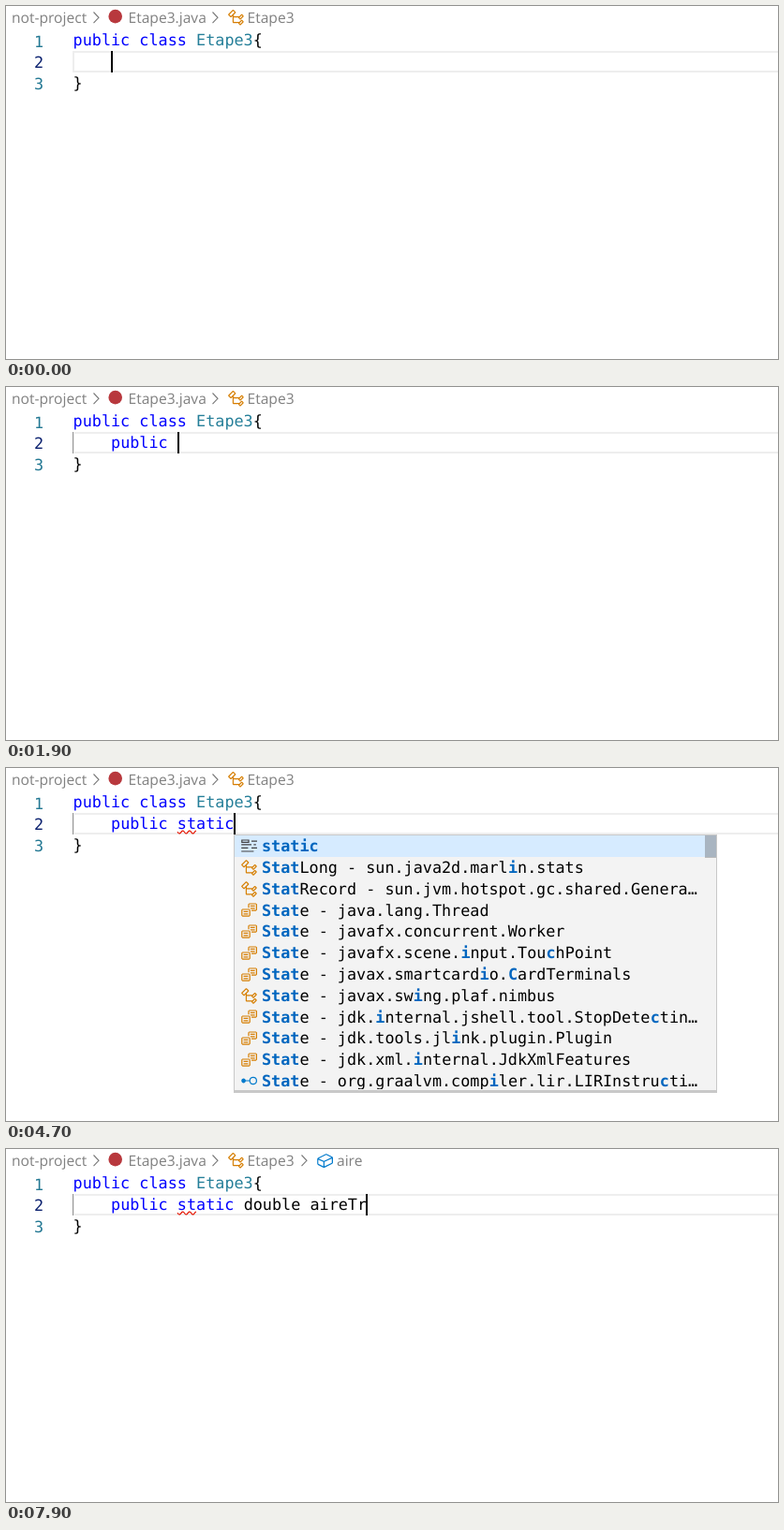
Animation, 824 px wide and 377 px high, one loop 8 s. Source, as an HTML page with a canvas:

```html
<!DOCTYPE html>
<html lang="en">
<head>
<meta charset="utf-8">
<title>Java editor typing</title>
<style>
html, body { margin: 0; width: 100%; height: 100%; overflow: hidden; background: #fff; }
canvas { display: block; }
</style>
</head>
<body>
<canvas id="stage" width="824" height="377"></canvas>
<script>
const ctx = document.getElementById('stage').getContext('2d');
const LOOP = 8000, CHAR = 10.114, ROW = 22.8, LEFT = 71.6;
const MONO = '16.8px "DejaVu Sans Mono", monospace';
const UI = '15.6px "Open Sans", sans-serif';
const BLUE = '#0000ff', TEAL = '#267f99', ORANGE = '#d67e00', SKY = '#007acc', DARK = '#424242';

// Icons on a 16 unit grid: colour, path
const icon = (color, d) => ({ color, path: new Path2D(d) });
const ICONS = {
  c: icon(ORANGE, 'M11.34 9.71h.71l2.67-2.67v-.71L13.38 5h-.7l-1.82 1.81h-5V5.56l1.86-1.85V3l-2-2H5L1 5v.71l2 2h.71l1.14-1.15v5.79l.5.5H10v.52l1.33 1.34h.71l2.67-2.67v-.71L13.37 10h-.7l-1.86 1.85h-5v-4H10v.48l1.34 1.38zm1.69-3.65l.63.63-2 2-.63-.63 2-2zm0 5l.63.63-2 2-.63-.63 2-2zM3.35 6.65l-1.29-1.3 3.29-3.29 1.3 1.29-3.3 3.3z'),
  i: icon(SKY, 'M11.5 4a3.49 3.49 0 0 0-3.46 3h-3.1a2 2 0 1 0 0 1h3.1a3.5 3.5 0 1 0 3.46-4zm0 6a2.5 2.5 0 1 1 0-5 2.5 2.5 0 0 1 0 5z'),
  k: icon(DARK, 'M15 4h-5V3h5v1zm-1 3h-2V6h2v1zm-4 0H1V6h9v1zm2 6H1v-1h11v1zm-5-3H1V9h6v1zm8 0h-5V9h5v1zM8 2v3H1V2h7zM7 3H2v1h5V3z'),
  s: icon(DARK, 'M2.5 1l-.5.5V13h1V2h11v11h1V1.5l-.5-.5zM2 14h1v1H2zM4 14h1v1H4zM6 14h1v1H6zM8 14h1v1H8zM10 14h1v1h-1zM12 14h1v1h-1zM14 14h1v1h-1z'),
  e: icon(ORANGE, 'M14 2H8L7 3v3h1V3h6v5h-4v1h4l1-1V3l-1-1zM9 6h4v1H9.41L9 6.59V6zM7 7H2L1 8v5l1 1h6l1-1V8L8 7H7zm1 6H2V8h6v5zM3 9h4v1H3V9zm0 2h4v1H3v-1zm6-7h4v1H9V4z'),
  f: icon(SKY, 'M14.45 4.5l-5-2.5h-.9l-7 3.5-.55.89v4.5l.55.9 5 2.5h.9l7-3.5.55-.9v-4.5l-.55-.89zm-8 8.64l-4.5-2.25V7.17l4.5 2v3.97zm.5-4.8L2.29 6.23l6.66-3.34 4.67 2.34-6.67 3.11zm7 1.55l-6.5 3.25V9.21l6.5-3v3.68z')
};

// Suggestions: icon key, then label
const PUB = [
  'k public', 's public_method', 's public_static_method',
  'i PublicKey - java.security', 'i Publisher - java.util.concurrent.Flow',
  'c PublisherAdapter - jdk.internal.net.http.Requ…',
  'i PrintJobAttributeListener - javax.print.event',
  'i PrintServiceAttributeListener - javax.print.e…',
  'c PackageSummaryBuilder - jdk.javadoc.internal.…',
  'c PortUnreachableException - java.net',
  'c PluginFactory_BeginLockScopeNode - org.graalv…',
  'c PluginFactory_CipherBlockChainingSubstitution…'
];
const PUBLIC = [
  ...PUB.slice(0, 4), 'c PublicMethods - java.lang',
  'c PublicSuffixes - sun.security.util', PUB[8], PUB[10], PUB[11]
];
const ST = [
  'c standard - jdk.javadoc.internal.doclets.form…',
  'c standard_ja - jdk.javadoc.internal.doclets.fo…',
  'c standard_zh_CN - jdk.javadoc.internal.doclets…',
  'k static', 'k strictfp',
  ...['StackOverflowError', 'StackTraceElement', 'StackWalker', 'StrictMath',
    'String', 'StringBuffer', 'StringBuilder'].map(n => `c ${n} - java.lang`)
];
const STAT = [
  'k static', 'c StatLong - sun.java2d.marlin.stats',
  'c StatRecord - sun.jvm.hotspot.gc.shared.Genera…',
  ...['e java.lang.Thread', 'e javafx.concurrent.Worker', 'e javafx.scene.input.TouchPoint',
    'e javax.smartcardio.CardTerminals', 'c javax.swing.plaf.nimbus',
    'e jdk.internal.jshell.tool.StopDetectin…', 'e jdk.tools.jlink.plugin.Plugin',
    'e jdk.xml.internal.JdkXmlFeatures', 'i org.graalvm.compiler.lir.LIRInstructi…'
  ].map(s => `${s[0]} State - ${s.slice(2)}`)
];
const DOUB = [
  'k double', 'c Double - java.lang',
  'c DoubleAccumulator - java.util.concurrent.atom…',
  'c DoubleAdder - java.util.concurrent.atomic',
  'i DoubleBinaryOperator - java.util.function',
  'c DoubleBinding - javafx.beans.binding', 'c DoubleBuffer - java.nio',
  'c DoubleByte - sun.nio.cs', 'c DoubleByteEncoder - sun.font',
  'c DoubleConsts - jdk.internal.math', 'i DoubleConsumer - java.util.function',
  'c DoubleConversion - jdk.nashorn.internal.runti…'
];

// Time, characters typed, suggestions, scrollbar height, scrollbar opacity
const LINE = 'public static double aireTr';
const STEPS = [
  [0, 0], [700, 1], [800, 1, PUB, 24, .2], [900, 1, PUB, 24, 1], [1100, 2, PUB, 24, 1],
  [1300, 3, PUB, 60, 1], [1400, 4, PUB, 120, 1], [1500, 5, PUB, 205, 1], [1600, 6, PUBLIC, 0, 0],
  [1900, 7], [2300, 8], [2700, 9], [3000, 9, ST, 24, .12], [3100, 9, ST, 24, .6], [3200, 9, ST, 24, 1],
  [3900, 10, STAT, 24, 1], [4100, 11, STAT, 24, 1], [4300, 12, STAT, 24, 1], [4600, 13, STAT, 24, 1],
  [4900, 14], [5100, 15], [5300, 16], [5400, 17], [5500, 17, DOUB, 60, .1], [5600, 18, DOUB, 60, .15],
  [5700, 19, DOUB, 60, .7], [5800, 20, DOUB, 60, 1], [6000, 21], [6400, 22], [6600, 23], [6700, 24],
  [6900, 25], [7600, 26], [7900, 27]
];

function rect(x, y, w, h, color) {
  ctx.fillStyle = color;
  ctx.fillRect(x, y, w, h);
}

function text(s, x, y, color, font = MONO) {
  ctx.font = font;
  ctx.fillStyle = color;
  ctx.fillText(s, x, y);
}

function drawIcon(key, x, y) {
  const { color, path } = ICONS[key];
  ctx.save();
  ctx.translate(x, y);
  ctx.scale(1.2, 1.2);
  ctx.fillStyle = color;
  ctx.fill(path, 'evenodd');
  ctx.restore();
}

function stroke(points, color, width) {
  ctx.beginPath();
  points.forEach(p => ctx.lineTo(...p));
  ctx.strokeStyle = color;
  ctx.lineWidth = width;
  ctx.stroke();
}

const caretX = n => Math.round(112.2 + 10.07 * n);
const chevron = x => stroke([[x, 6.5], [x + 5.5, 12.3], [x, 18.1]], '#777', 1.1);

function breadcrumbs(showMethod) {
  const gray = '#818181';
  text('not-project', 6, 18, gray, UI);
  chevron(93.5);
  ctx.beginPath();
  ctx.arc(116.7, 11.1, 7.3, 0, 7);
  ctx.fillStyle = '#b8383d';
  ctx.fill();
  text('Etape3.java', 130.5, 18, gray, UI);
  chevron(220.5);
  drawIcon('c', 236, 2.8);
  text('Etape3', 257.5, 18, gray, UI);
  if (!showMethod) return;
  chevron(315.5);
  drawIcon('f', 331, 2.8);
  text('aire', 353, 18, gray, UI);
}

function bulb() {
  ctx.beginPath();
  ctx.arc(85, 55.5, 6, 2.2, .94);
  ctx.lineTo(88, 65.5);
  ctx.lineTo(82, 65.5);
  ctx.fillStyle = '#ddb100';
  ctx.fill();
  rect(83.4, 61.6, 3.2, 2.4, '#fff');
}

function squiggle() {
  const wave = Array.from({ length: 41 }, (_, i) =>
    [183 + i / 2, 68.5 + 1.5 * Math.cos((i / 2 - 2.1) * 2 * Math.PI / 7.2)]);
  stroke(wave, '#e51400', 1.2);
}

// Marks the query letters in the order they occur
function label(s, query, x, y) {
  let hit = 0, start = 0;
  const marks = [...s].map(ch => ch.toLowerCase() === query[hit] && ++hit > 0);
  for (let i = 1; i <= s.length; i++) {
    if (i < s.length && marks[i] === marks[start]) continue;
    const bold = marks[start];
    text(s.slice(start, i), x + start * CHAR, y, bold ? '#0066bf' : '#000', (bold ? 'bold ' : '') + MONO);
    start = i;
  }
}

function popup(n, query, items, barHeight, barAlpha, tall) {
  const x = caretX(n);
  const bottom = Math.round(71.2 + ROW * items.length);
  rect(x, 71, 516, bottom - 71 + (tall ? 2 : 0), '#c8c8c8');
  rect(x + 1, 72, 514, bottom - 73, '#f3f3f3');
  rect(x + 1, 72, 514, 23, '#d6ebff');
  ctx.save();
  ctx.beginPath();
  ctx.rect(x + 1, 72, 502, bottom - 74);
  ctx.clip();
  items.forEach((item, i) => {
    drawIcon(item[0], x + 7, Math.round(74 + ROW * i));
    label(item.slice(2), query, x + 30, Math.round(89.2 + ROW * i));
  });
  ctx.restore();
  rect(x + 503, 72, 12, barHeight, `rgba(100,100,100,${.4 * barAlpha})`);
}

function draw(t) {
  const [, n, items, barHeight, barAlpha] = STEPS.findLast(s => s[0] <= t);
  const within = (a, b) => t >= a && t < b;
  const words = LINE.slice(0, n).split(' ');
  rect(0, 0, 824, 377, '#fff');
  breadcrumbs(t >= 7400);

  ctx.strokeStyle = '#eee';
  ctx.lineWidth = 2;
  ctx.strokeRect(72, 49, 760, 21);
  if (n) rect(71, 48, 1, 23, '#939393');

  for (let i = 0; i < 3; i++) text(i + 1, 30, [44, 66, 89][i], i === 1 ? '#0b216f' : '#237893');
  text('public class', LEFT, 42, BLUE);
  text('Etape3', LEFT + 13 * CHAR, 42, TEAL);
  text('{', LEFT + 19 * CHAR, 42, '#000');
  text('}', LEFT, 88, '#000');

  let col = 4;
  for (const word of words) {
    const keyword = word === 'public' || word === 'static';
    text(word, LEFT + col * CHAR, 65, keyword ? BLUE : '#000');
    col += word.length + 1;
  }
  if (t >= 3700) squiggle();
  if (within(3400, 4700) || within(7400, 7900)) bulb();
  if (items) popup(n, words.at(-1), items, barHeight, barAlpha, within(3400, 4900));

  const hidden = within(300, 700) || within(3200, 3700) || within(7400, 7600);
  if (!hidden) rect(caretX(n), 48, 2, 23, '#000');
}

const begin = performance.now();
function frame() {
  ctx.textRendering = 'geometricPrecision';
  draw((performance.now() - begin) % LOOP);
  requestAnimationFrame(frame);
}
frame();
</script>
</body>
</html>
```
